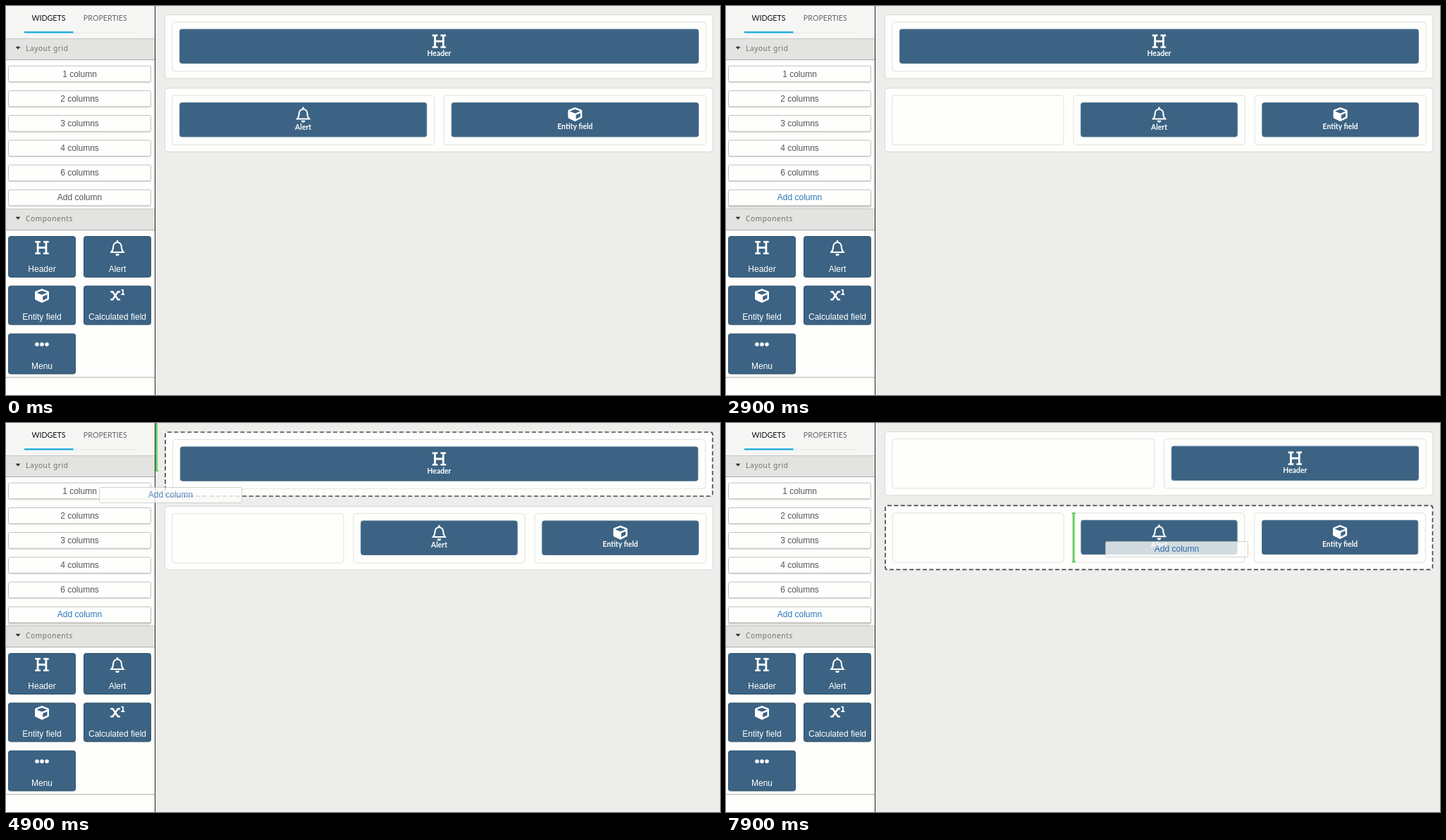
Animation of 1013x553 px, one loop 8000 ms. Source, as an HTML page:

```html
<!DOCTYPE html>
<html lang="en">
<head>
<meta charset="utf-8">
<title>Layout builder</title>
<style>
html, body { margin: 0; width: 100%; height: 100%; overflow: hidden; background: #ededeb; }
svg { display: block; }
text { font: 12px "Liberation Sans", Arial, sans-serif; }
.mid { text-anchor: middle; }
.tab { font: 10.7px Lato, sans-serif; }
.section { font: 300 10.1px "Noto Sans", sans-serif; letter-spacing: .6px; fill: #70716e; }
.block { font: 700 10.4px Lato, sans-serif; fill: #fff; }
</style>
</head>
<body>
<svg id="stage" width="1013" height="553" viewBox="0 0 1013 553">
  <g id="canvas"></g>
  <g id="sidebar"></g>
  <g id="addButton"></g>
  <g id="ghost"></g>
</svg>
<script>
const LOOP = 8000, STEP = 100;
const WHITE = '#fefffc', BLUE = '#3c6383', GREEN = '#66cf62';
const layer = id => document.getElementById(id);

const rect = (x, y, w, h, fill, extra = '') =>
  `<rect x="${x}" y="${y}" width="${w}" height="${h}" fill="${fill}" ${extra}/>`;
// Rectangle with a one pixel border inside its outer edge
const box = (x, y, w, h, fill, stroke, r = 3) =>
  rect(x + .5, y + .5, w - 1, h - 1, fill, `stroke="${stroke}" rx="${r}"`);
const text = (x, y, str, fill, cls = 'mid') =>
  `<text x="${x}" y="${y}" fill="${fill}" class="${cls}">${str}</text>`;
const line = (d, w) => `<path d="${d}" fill="none" stroke="#fff" stroke-width="${w}"/>`;
const solid = d => `<path d="${d}" fill="#fff" fill-rule="evenodd"/>`;

const icons = {
  'Header': line('M-9.7-8.3H-2M2-8.3H9.7M-9.7 8.3H-2M2 8.3H9.7', 2.6) +
    line('M-5.9-8V8M5.9-8V8M-6 0H6', 2.8),
  'Alert': line('M-8.6 5.9C-6.5 3.5-5.8 1-5.8-2.1A5.8 5.8 0 0 1 5.8-2.1C5.8 1 6.5 3.5 8.6 5.9Z', 2) +
    solid('M-1.4-8V-9.6A1.4 1.4 0 0 1 1.4-9.6V-8ZM-2.8 8.2A2.8 2.8 0 0 0 2.8 8.2Z'),
  'Entity field': solid('M0-10L9-6.5Q10-6 10-5V4Q10 5.2 9 5.7L0 10L-9 5.7Q-10 5.2-10 4V-5Q-10-6-9-6.5Z' +
    'M0-7.3L7.5-4.5L0-1.4L-7.5-4.5ZM1.25 6.6V.8L7.5-1.8V3.4Z'),
  'Calculated field': line('M-9.8-4.8H-6.6L.8 6.2H4M4-4.8H.8L-6.6 6.2H-9.8', 2.5) +
    line('M5.6-7.4H7.9V-.8M5.4-1H10.2', 1.8),
  'Menu': [-7, 0, 7].map(x => `<circle cx="${x}" cy="0" r="2.8" fill="#fff"/>`).join('')
};
const icon = (name, x, y) => `<g transform="translate(${x} ${y})">${icons[name]}</g>`;

const section = (y, label) => rect(0, y, 211, 31, '#e3e4e1') +
  rect(0, y, 211, 1, '#c6c7c4') + rect(0, y + 30, 211, 1, '#aaaba8') +
  `<path d="M13.5 ${y + 11.8}h7l-3.5 4z" fill="#333"/>` +
  text(28, y + 18, label, '#70716e', 'section');

const tile = (name, x, y, h, iconY, labelY) => box(x, y, 96, h, BLUE, '#31556f') +
  icon(name, x + 48, iconY) + text(x + 48, labelY, name, '#fff');

const button = (i, label, hover = 0) => {
  const y = 84.7 + 35.2 * i, mix = (a, b) => Math.round(a + (b - a) * hover);
  return rect(3, y + 1.4, 203, 23.4, '#000', 'rx="3" opacity=".13"') +
    rect(2.5, y + 2, 204, 25, '#000', `rx="3" opacity="${.1 * hover}"`) +
    box(3, y, 203, 23.6, WHITE, '#bfc0bd', 2) +
    text(104.5, 101 + 35 * i, label, `rgb(${mix(85, 42)},${mix(85, 117)},${mix(85, 190)})`);
};

layer('sidebar').innerHTML =
  rect(0, 0, 211, 553, WHITE) + rect(0, 0, 211, 46, '#f6f7f5') + rect(211, 0, 1, 553, '#222') +
  text(60.5, 21, 'WIDGETS', '#111', 'mid tab') + text(140.8, 21, 'PROPERTIES', '#666', 'mid tab') +
  rect(95, 37, 90, 2, '#edf0ec') + rect(26, 36.2, 69.5, 2.3, '#17a9de') +
  section(46, 'Layout grid') + section(288, 'Components') +
  ['1 column', '2 columns', '3 columns', '4 columns', '6 columns'].map((s, i) => button(i, s)).join('') +
  tile('Header', 3, 327, 59, 343.5, 378) + tile('Alert', 110, 327, 59, 344, 378) +
  tile('Entity field', 3, 397.5, 56, 412, 446) + tile('Calculated field', 110, 397.5, 56, 411, 446) +
  tile('Menu', 3, 465.5, 58, 481, 516) + rect(0, 527.5, 211, 1, '#aaaba8');

// Each drag: [time, ghost x, ghost y, row under pointer, insertion column]; column -1 parks the marker
const drags = [
  [[2100, 12, 240, -1, -1], [2300, 70, 195, -1, -1], [2500, 122, 160, 1, 0], [2700, 140, 150, 1, 0], [2900, 140, 150, 1, 0]],
  [[4300, 10, 250, -1, -1], [4500, 90, 175, 1, -1], [4600, 118, 150, 1, -1], [4700, 123, 124, 0, -1],
   [4900, 132, 91, 0, -1], [5000, 134, 87, 0, 0], [5200, 137, 82, 0, 0], [5500, 137, 82, 0, 0]],
  [[7600, 75, 250, -1, -1], [7700, 195, 225, 1, -1], [7800, 370, 196, 1, 1], [7900, 538, 168, 1, 1], [8000, 538, 168, 1, 1]]
];

function dragAt(t) {
  const keys = drags.find(k => t >= k[0][0] && t < k[k.length - 1][0]);
  if (!keys) return null;
  const i = keys.findIndex(k => k[0] > t), a = keys[i - 1], b = keys[i];
  const p = (t - a[0]) / (b[0] - a[0]), at = n => a[n] + (b[n] - a[n]) * p;
  return { x: at(1), y: at(2), row: a[3], col: a[4] };
}

// The add button fades in and out of its hover look
function hoverAt(t) {
  const ramp = (start, length) => {
    const p = Math.min(1, Math.max(0, (t - start) / length));
    return p * p * (3 - 2 * p);
  };
  return ramp(1600, 400) - ramp(2900, 300) + ramp(3700, 300) - ramp(5800, 300) + ramp(6300, 300);
}

const block = (name, x, y, w) => {
  const mid = x + w / 2, lift = name === 'Entity field' ? 1 : 0;
  return box(x, y, w, 49.4, BLUE, '#557890') + icon(name, mid, y + 17.6 - lift / 2) +
    text(mid, y + 38.7 - lift, name, '#fff', 'mid block');
};

const marker = (x, y) => rect(x - 1.5, y, 3, 71, GREEN) +
  rect(x - 2.7, y, 5.4, 2, GREEN) + rect(x - 2.7, y + 69, 5.4, 2, GREEN);

function drawRow(y, cells, active, markAt) {
  const grow = active ? .8 : 0, h = 91.4 + 2 * grow, gap = 13;
  const left = 235.3 + grow, width = (758.4 - 2 * grow - gap * (cells.length - 1)) / cells.length;
  const top = y + 10.2 + grow;
  let out = active
    ? rect(226, y + 1, 776.5, h - 2, WHITE, 'rx="3" stroke="#4a4a4a" stroke-width="1.7" stroke-dasharray="6 3.4"')
    : box(225, y, 778.4, h, WHITE, '#d8d9d6', 4);
  cells.forEach((name, i) => {
    const x = left + i * (width + gap);
    out += box(x, top, width, 71.2, WHITE, '#dfe0dd', 4);
    if (name) out += block(name, x + 10.7, top + 10.4, width - 21.4);
  });
  if (active) out += markAt < 0 ? marker(213.5, -2) : marker(left + markAt * (width + gap) + .5, top);
  return { out, bottom: y + h };
}

function render(t) {
  const drag = dragAt(t), { row = -1, col = -1 } = drag || {};
  const first = t < 5500 ? ['Header'] : ['', 'Header'];
  const second = t < 2900 ? ['Alert', 'Entity field'] : ['', 'Alert', 'Entity field'];
  const a = drawRow(12, first, row === 0, col);
  const b = drawRow(a.bottom + 13, second, row === 1, col);
  layer('canvas').innerHTML = rect(212, 0, 801, 553, '#ededeb') + a.out + b.out;
  layer('addButton').innerHTML = button(5, 'Add column', hoverAt(t));
  layer('ghost').innerHTML = drag
    ? `<g transform="translate(${drag.x} ${drag.y})" opacity=".77">` +
      box(0, 0, 203, 23, WHITE, '#c4c5c2', 2) + text(101.5, 15.2, 'Add column', '#2a69b5') + '</g>'
    : '';
}

let shown = -1;
function tick() {
  const t = Math.floor(performance.now() % LOOP / STEP) * STEP;
  if (t !== shown) render(shown = t);
  requestAnimationFrame(tick);
}
tick();
</script>
</body>
</html>
```
